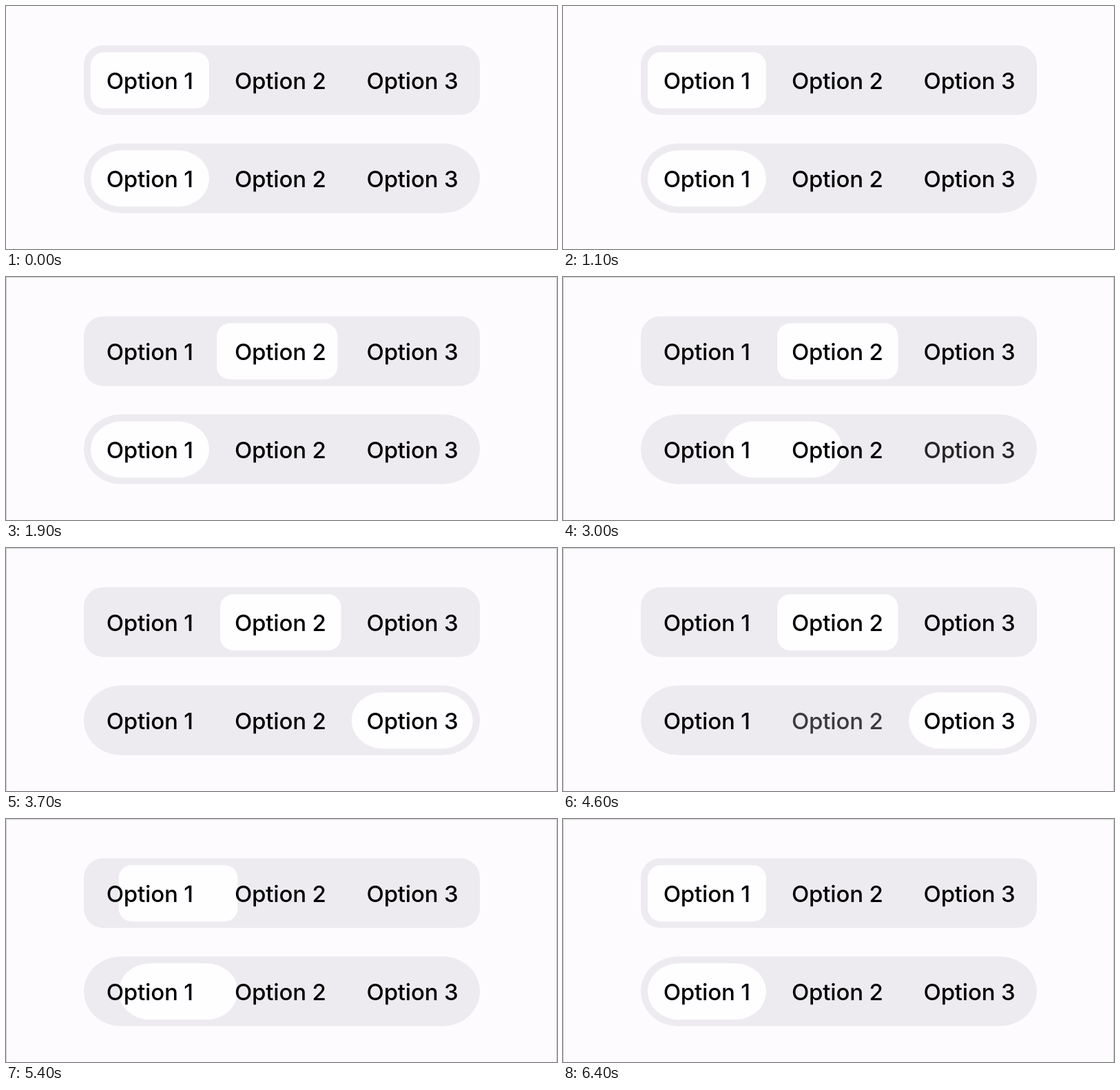
Recreate the animation shown at these times as an HTML page. Size 800x354 px, loop 6600 ms.

```html
<!DOCTYPE html>
<html lang="en">
<head>
<meta charset="utf-8">
<title>Segmented controls</title>
<style>
  html, body { margin: 0; width: 100%; height: 100%; overflow: hidden; background: #fdfbfe; }
  svg { display: block; width: 100%; height: 100%; }
  text { font: 500 33px Inter, "Open Sans", sans-serif; letter-spacing: -.2px; text-anchor: middle; }
  .track { fill: #edebf0; }
  .thumb { fill: #fefdff; }
  #edge { fill: none; stroke: #cccace; }
</style>
</head>
<body>
<svg id="stage" viewBox="0 0 800 354">
  <path id="edge" d="M.5 354V.5H799.5V354"/>
</svg>
<script>
const LOOP = 6600, STEP = 100;
const OMEGA = 4 * Math.PI / 1000;   // critically damped spring, 0.5 s response
const SLOTS = [[123, 172], [311, 175.5], [502, 176]];   // thumb x and width

const controls = [
  { y: 57, track: [28, 28], thumb: [19, 19], moves: [
    { press: 1455, start: 1463, to: 1 },
    { press: 5160, start: 5170, to: 0 }] },
  { y: 200, track: [54, 50.5], thumb: [45, 41], moves: [
    { press: 2790, start: 2915, to: 2 },
    { press: 4590, start: 4615, to: 1 },
    { press: 5160, start: 5170, to: 0 }] }
];

const stage = document.getElementById('stage');
const edge = document.getElementById('edge');

function add(tag, attrs) {
  const el = document.createElementNS('http://www.w3.org/2000/svg', tag);
  for (const key in attrs) el.setAttribute(key, attrs[key]);
  return stage.appendChild(el);
}

for (const c of controls) {
  add('rect', { class: 'track', x: 113, y: c.y + .3, width: 575, height: 101.4, rx: c.track[0], ry: c.track[1] });
  c.knob = add('rect', { class: 'thumb', y: c.y + 10.3, height: 82, rx: c.thumb[0], ry: c.thumb[1] });
  c.labels = [208.7, 398.3, 590].map((x, i) => {
    const label = add('text', { x, y: c.y + 64.3 });
    label.textContent = 'Option ' + (i + 1);
    return label;
  });
}

function spring(ms) {
  const u = OMEGA * Math.max(0, ms);
  return 1 - (1 + u) * Math.exp(-u);
}

// Pressed labels dim, then fade back after release.
function labelOpacity(t, { press, start }) {
  if (t < press) return 1;
  return Math.min(1, .75 + .25 * Math.max(0, t - start) / 240);
}

function draw(t) {
  edge.style.display = t < 1500 ? 'none' : '';
  for (const c of controls) {
    let box = SLOTS[0];
    const opacity = [1, 1, 1];
    for (const m of c.moves) {
      const p = spring(t - m.start);
      box = box.map((v, i) => v + (SLOTS[m.to][i] - v) * p);
      opacity[m.to] = Math.min(opacity[m.to], labelOpacity(t, m));
    }
    c.knob.setAttribute('x', box[0]);
    c.knob.setAttribute('width', box[1]);
    c.labels.forEach((label, i) => label.setAttribute('opacity', opacity[i]));
  }
}

function tick() {
  const t = (performance.now() - begin) % LOOP;
  draw(Math.floor(t / STEP) * STEP);
  requestAnimationFrame(tick);
}

const begin = performance.now();
tick();
</script>
</body>
</html>
```
